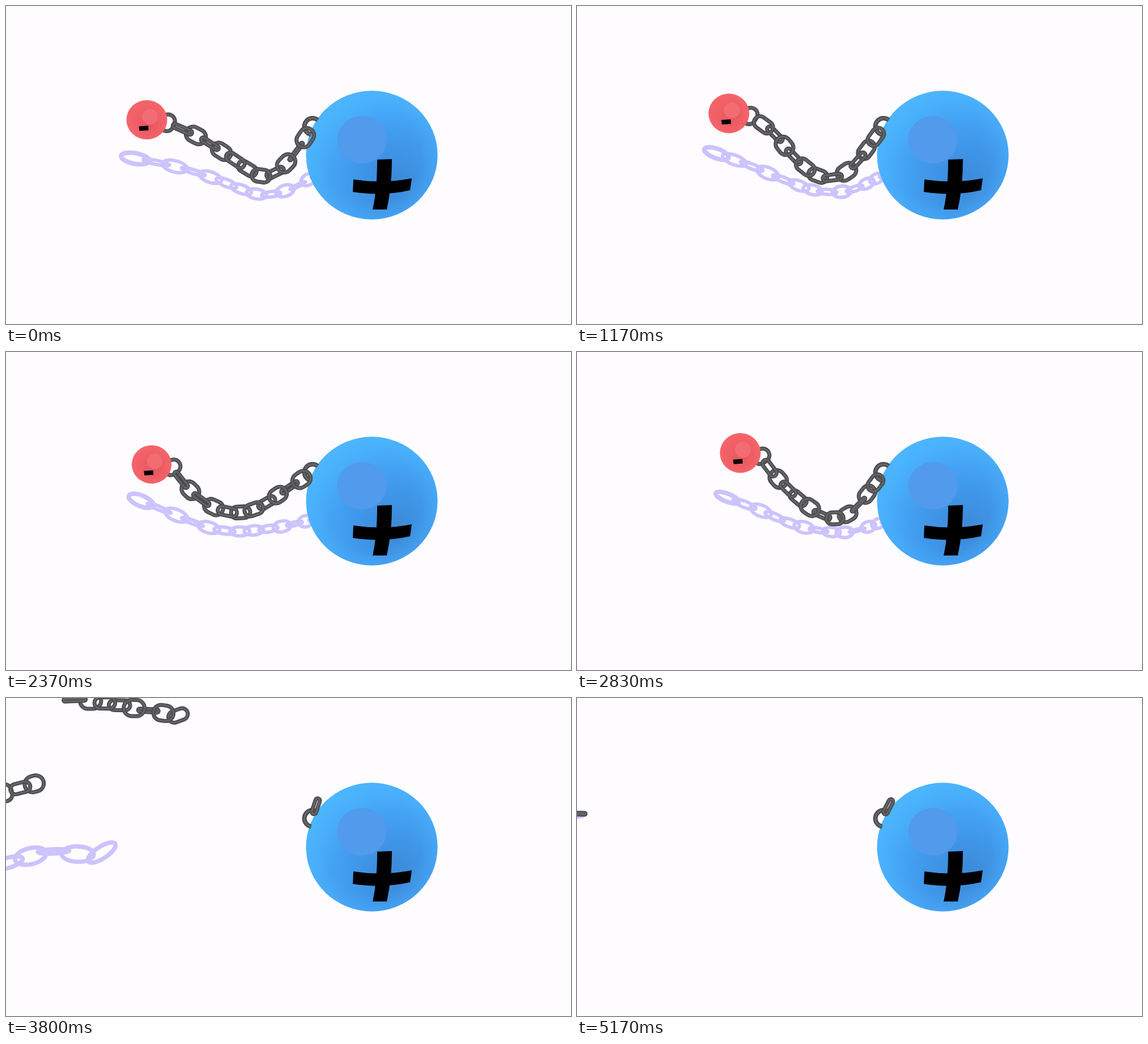
Write an HTML page with a canvas that moves like this. It is 997 px wide and 561 px high and loops after 5210 ms.

```html
<!DOCTYPE html>
<html lang="en">
<head>
<meta charset="utf-8">
<title>Charges on a chain</title>
<style>
html, body { margin: 0; width: 100%; height: 100%; overflow: hidden; background: #fefcff; }
canvas { display: block; }
</style>
</head>
<body>
<canvas id="stage" width="997" height="561"></canvas>
<script>
const ctx = document.getElementById('stage').getContext('2d');
const LOOP = 5210, BREAK = 3110, FREE = 3430;
const PI = Math.PI, TAU = PI * 2;
const WHOLE = [13], PIECES = [3, 8, 2], LAST = 10, LOOSE = 11;
const HOOK = [541, 212];
const lerp = (a, b, s) => a + (b - a) * s;

// Smooth curve through a few points
function spline(points, t) {
  const i = Math.min(Math.floor(t), points.length - 2), u = t - i;
  const at = j => points[Math.max(0, Math.min(points.length - 1, j))];
  return [0, 1].map(k => {
    const [a, b, c, d] = [at(i - 1), at(i), at(i + 1), at(i + 2)].map(p => p[k]);
    return b + u * (c - a + u * (2 * a - 5 * b + 4 * c - d + u * (3 * (b - c) + d - a))) / 2;
  });
}

// Links along the curve; taper makes the spacing shrink towards the end
function place(points, count, taper) {
  const path = [{ p: points[0], d: 0 }], fine = 24;
  for (let k = 1; k <= (points.length - 1) * fine; k++) {
    const p = spline(points, k / fine), last = path[path.length - 1];
    path.push({ p, d: last.d + Math.hypot(p[0] - last.p[0], p[1] - last.p[1]) });
  }
  const total = path[path.length - 1].d;
  const spots = Array.from({ length: count }, (_, i) => {
    const u = i / (count - 1);
    const d = total * u * (1 + taper - taper * u);
    return (path.find(s => s.d >= d) || path[path.length - 1]).p;
  });
  return spots.map(([x, y], i) => {
    const p = Math.max(0, i - 1), n = Math.min(count - 1, i + 1);
    const dx = spots[n][0] - spots[p][0], dy = spots[n][1] - spots[p][1];
    return { x, y, a: Math.atan2(dy, dx), l: Math.hypot(dx, dy) / (n - p) * 0.67 };
  });
}

// face: a link turned to the viewer; twist: extra turn per link; tilt: angle of the torn end
function pose({ ball, chain, shadow, face, twist, tilt = 0, size = 1 }) {
  const build = (curves, taper) => {
    const counts = curves.length > 1 ? PIECES : WHOLE;
    const links = curves.flatMap((c, i) => place(c, counts[i], curves.length > 1 ? 0 : taper));
    links[LAST].a += tilt;
    return links;
  };
  return { ball, face, twist, size, chain: build(chain, 0), shadow: build(shadow, 0.28) };
}

const low = pose({
  ball: [248.5, 200.7, 36], face: 2, twist: 0.2,
  chain: [[[285, 206], [340, 231], [400, 269], [454, 300], [498, 274], HOOK]],
  shadow: [[[228, 269], [298, 283], [370, 305], [445, 332], [501, 323], [550, 296]]]
});
const near = pose({
  ball: [268, 189.5, 36], face: 3, twist: -0.31,
  chain: [[[305, 194], [346, 223], [384, 267], [431, 301], [480, 289], HOOK]],
  shadow: [[[246, 260], [311, 284], [371, 309], [425, 326], [482, 325], [545, 296]]]
});
const far = pose({
  ball: [237, 211.3, 34.5], face: 2, twist: 0,
  chain: [[[273, 216], [303, 254], [349, 283], [400, 281], [466, 243], HOOK]],
  shadow: [[[221, 266], [278, 290], [335, 312], [390, 319], [450, 309], [545, 293]]]
});
const high = pose({
  ball: [288, 178.2, 36], face: 2, twist: 0.45,
  chain: [[[325, 184], [355, 224], [405, 270], [450, 293], [488, 278], HOOK]],
  shadow: [[[265, 257], [327, 281], [385, 305], [445, 317], [487, 316], [548, 297]]]
});
const taut = pose({
  ball: [168, 187, 36.5], face: 4, twist: 0.2,
  chain: [[[205, 190], HOOK]],
  shadow: [[[138, 266], [540, 297]]]
});

const stub = [[549, 192], HOOK], hidden = [[590, 300], [610, 300]];
const tornShadow = [
  [[-62, 250], [0, 262]],
  [[88, 257], [171, 240], [254, 216], [297, 207], [345, 212], [382, 209]],
  hidden
];
const torn = pose({
  ball: [50, 174.3, 40], face: 8, twist: 0.4, tilt: -0.85, size: 1.15,
  chain: [[[92, 180], [141, 171]], [[217, 162], [279, 145], [340, 126], [372, 118], [415, 123]], stub],
  shadow: tornShadow
});
const flown = pose({
  ball: [-180, 190, 42], face: 10, twist: 0.2, size: 1.1,
  chain: [[[-145, 160], [-90, 140]], [[-26, 2], [17, 17], [87, 56], [133, 68]], stub],
  shadow: tornShadow.map(c => c.map(([x, y]) => c === hidden ? [x, y] : [x - 540, y + 10]))
});
const landed = pose({
  ball: [-260, 200, 42], face: 9, twist: 0,
  chain: [[[-245, 200], [-200, 200]], [[-187, 200], [0, 204]], stub],
  shadow: [[[-250, 208], [-205, 208]], [[-193, 208], [-4, 208]], hidden]
});

const linear = u => u;
const cosine = u => (1 - Math.cos(PI * u)) / 2;
const easeOut = u => 1 - (1 - u) ** 2;
const unfinished = u => cosine(u * 0.85) / cosine(0.85);
const snap = u => 1.3 * u ** 3 - 0.3 * u;
const fall = u => Math.min(1, 0.7 * u + 0.89 * u * u);

// end time, from, to, ease x, ease y, height of the arc
const steps = [
  [1170, low, near, cosine, cosine, 0],
  [1930, near, far, cosine, cosine, 0],
  [2830, far, high, unfinished, unfinished, 0],
  [BREAK, high, taut, snap, snap, 0],
  [FREE, taut, torn, easeOut, easeOut, 0],
  [4370, torn, flown, linear, easeOut, 60],
  [5170, flown, landed, linear, fall, 0]
];

function mixLinks(from, to, sx, sy, lift) {
  return from.map((p, i) => {
    const q = to[i], turn = q.a - p.a;
    return {
      x: lerp(p.x, q.x, sx),
      y: lerp(p.y, q.y, sy) + (i > 2 && i < LOOSE ? lift : 0),
      l: lerp(p.l, q.l, sx),
      a: p.a + (turn - PI * Math.round(turn / PI)) * sx
    };
  });
}

function swing(link, s) {
  link.a = -1.1 - 0.17 * Math.exp(-3 * s) + 0.6 * Math.exp(-4 * s) * Math.sin(TAU * s / 0.6);
  link.x = 541 + 18 * Math.cos(link.a);
  link.y = 208 + 18 * Math.sin(link.a);
  link.w = 4;
}

function sceneAt(t) {
  const found = steps.findIndex(s => t < s[0]), k = found < 0 ? steps.length - 1 : found;
  const [end, from, to, easeX, easeY, height] = steps[k];
  const begin = k ? steps[k - 1][0] : 0;
  const u = Math.min(1, (t - begin) / (end - begin)), sx = easeX(u), sy = easeY(u);
  const lift = height * 4 * u * (1 - u);
  const mix = key => lerp(from[key], to[key], sx);
  const face = mix('face'), twist = mix('twist'), size = mix('size');
  const chain = mixLinks(from.chain, to.chain, sx, sy, -lift);
  const shadow = mixLinks(from.shadow, to.shadow, sx, sy, lift);
  chain.forEach((link, i) => {
    const open = Math.abs(Math.cos((i - face) * (PI / 2 + twist)));
    link.w = (1.5 + 11.5 * open) * size;
    shadow[i].w = (2 + 8 * open) * size ** 3;
  });
  Object.assign(chain[0], { w: 15, l: 12 });
  if (t >= FREE) swing(chain[LOOSE], (t - FREE) / 1000);
  const ball = from.ball.map((v, i) => lerp(v, to.ball[i], i === 1 ? sy : sx));
  return { ball, chain, shadow, size };
}

function oval(x, y, rx, ry, fill) {
  ctx.beginPath();
  ctx.ellipse(x, y, rx, ry, 0, 0, TAU);
  ctx.fillStyle = fill;
  ctx.fill();
}

function radial(x0, y0, r0, x1, y1, r1, ...colors) {
  const g = ctx.createRadialGradient(x0, y0, r0, x1, y1, r1);
  colors.forEach((c, i) => g.addColorStop(i / (colors.length - 1), c));
  return g;
}

function line(width, color) {
  ctx.lineWidth = width;
  ctx.strokeStyle = color;
  ctx.stroke();
}

function tube(width) {
  line(width, '#474749');
  line(width * 0.6, '#59595b');
  line(width * 0.25, '#68686a');
}

function drawLink({ x, y, w, l, a }) {
  ctx.save();
  ctx.translate(x, y);
  ctx.rotate(a);
  ctx.beginPath();
  ctx.roundRect(-l, -w, 2 * l, 2 * w, Math.min(l, w));
  tube(7);
  ctx.restore();
}

function drawShadow({ x, y, w, l, a }, width) {
  ctx.beginPath();
  ctx.ellipse(x, y, l, w, a, 0, TAU);
  line(width, '#cdc3fd');
}

function shape(...corners) {
  ctx.beginPath();
  corners.forEach(c => c.length > 2 ? ctx.quadraticCurveTo(...c) : ctx.lineTo(...c));
  ctx.fillStyle = '#000';
  ctx.fill();
}

function drawBlue() {
  const [x, y, rx, ry] = [645.5, 263, 116, 113.5];
  oval(x, y, rx, ry, radial(685, 312, 0, 685, 312, 205, '#3c89d6', '#3f93e5', '#43a0f2', '#4ab2fd', '#50beff'));
  oval(x, y, rx, ry, radial(x, y, 85, x, y, rx, 'rgba(76,178,255,0)', 'rgba(76,178,255,.4)'));
  oval(628, 236, 43.5, 42, '#529aeb');
  shape([655, 271], [681, 270], [681, 318, 672, 359], [647, 359], [655, 322, 655, 271]);
  shape([613, 306], [665, 314, 716, 304], [713, 325], [665, 336, 612, 328]);
}

function drawRed([x, y, r]) {
  const side = 280 - x;
  const ry = r - 1 - side * 0.01, mx = x - 4.5 - side * 0.03, my = y + 15;
  oval(x, y, r, ry, radial(x + 5, y + 10, 0, x, y, r + 1, '#e7575f', '#ee5d64', '#f5656b'));
  oval(x + 5 + side * 0.022, y - 5.5, r * 0.39, ry * 0.4, '#f36c73');
  shape([mx - 8.5, my - 3.5], [mx + 8, my - 4.5], [mx + 8.5, my + 3.5], [mx - 7.5, my + 4.5]);
}

function draw(t) {
  const { ball, chain, shadow, size } = sceneAt(t);
  ctx.fillStyle = '#fefcff';
  ctx.fillRect(0, 0, 997, 561);
  shadow.forEach((link, i) => drawShadow(link, (i ? 6 : 8) * size ** 2));
  drawBlue();
  ctx.beginPath();
  ctx.arc(541, 212.5, 14.5, -0.9, 1.75, true);
  tube(8);
  for (const parity of [0, 1]) {
    chain.slice(0, 12).forEach((link, i) => { if (i % 2 === parity) drawLink(link); });
  }
  drawRed(ball);
}

const start = performance.now();
function tick() {
  draw((performance.now() - start) % LOOP);
  requestAnimationFrame(tick);
}
tick();
</script>
</body>
</html>
```
